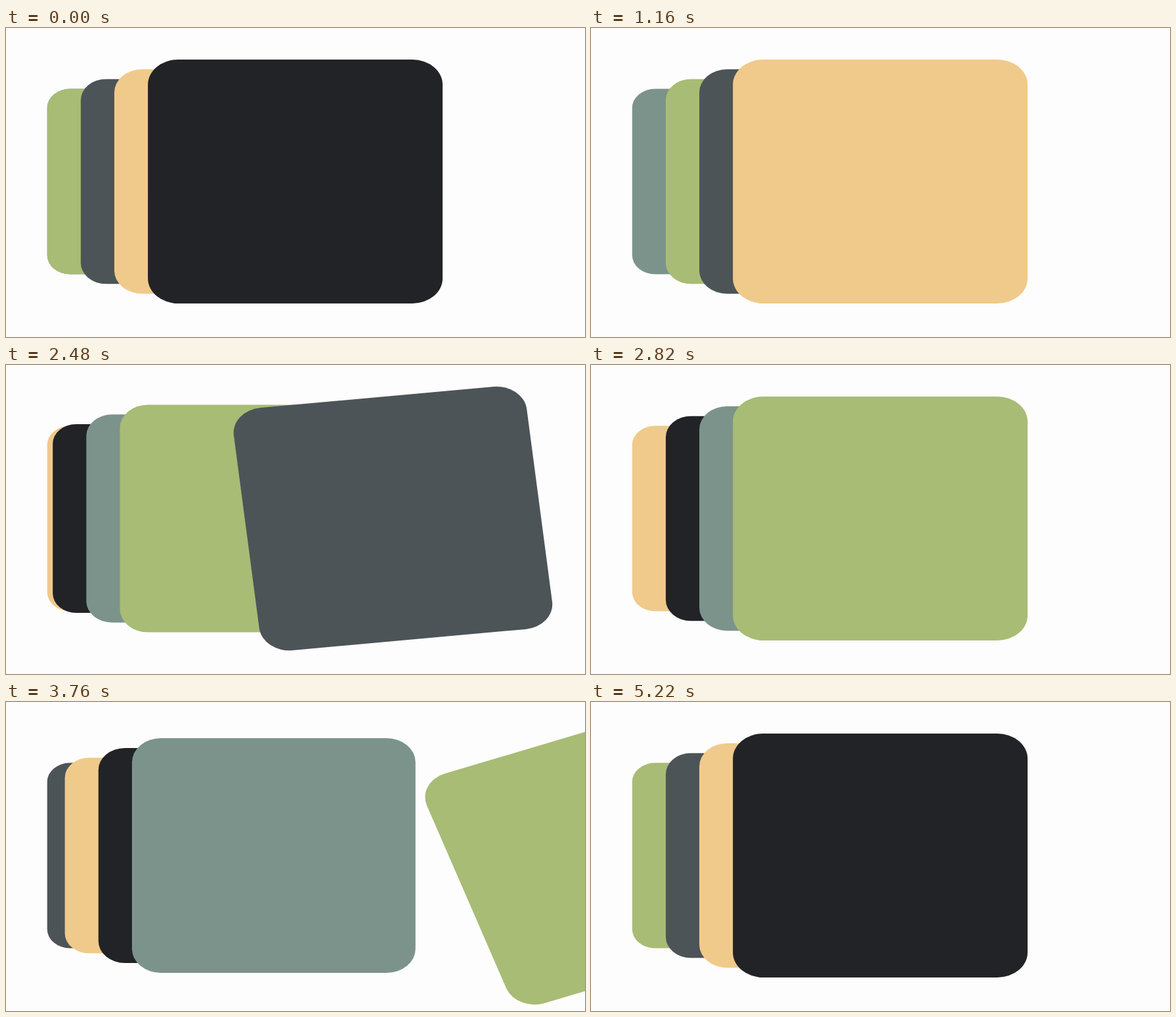
Write an HTML page that moves like this. It is 882 px wide and 470 px high and loops after 5760 ms.

```html
<!DOCTYPE html>
<html lang="en">
<head>
<meta charset="utf-8">
<title>Card stack</title>
<style>
  html, body {
    margin: 0;
    width: 100%;
    height: 100%;
    overflow: hidden;
    background: #fdfdfd;
  }
  .stage {
    position: absolute;
    inset: 0;
    overflow: hidden;
    contain: strict;
  }
  /* The scene is square cards, widened horizontally */
  .stack {
    position: absolute;
    left: 439.5px;
    top: 233.4px;
    transform: scaleX(1.21);
    transform-origin: 0 0;
  }
  .card {
    position: absolute;
    left: -185.5px;
    top: -185.5px;
    width: 371px;
    height: 371px;
    border-radius: 38px;
  }
</style>
</head>
<body>
<div class="stage"><div class="stack"></div></div>
<script>
  const LOOP = 5760;
  const DURATION = 400;
  const STARTS = [0, 1170, 2368, 3555, 4770];
  const COLORS = ['#222326', '#f0ca8b', '#4d5457', '#a8bc75', '#7c938c'];
  const COUNT = COLORS.length;
  const LAST_SLOT = 3;
  const GAP = 57.1;
  const SHRINK = 0.08;
  const EXIT_X = 742;
  const EXIT_TURN = -37.6;

  const stack = document.querySelector('.stack');
  const cards = COLORS.map(color => {
    const card = document.createElement('div');
    card.className = 'card';
    card.style.background = color;
    return stack.appendChild(card);
  });

  // cubic-bezier(.42, 0, .58, 1)
  function easeInOut(x) {
    if (x <= 0) return 0;
    if (x >= 1) return 1;
    let lo = 0, hi = 1, u = 0.5;
    for (let i = 0; i < 24; i++) {
      const v = 1 - u;
      const bx = 1.26 * v * v * u + 1.74 * v * u * u + u * u * u;
      if (bx < x) lo = u; else hi = u;
      u = (lo + hi) / 2;
    }
    return u * u * (3 - 2 * u);
  }

  function pose(depth, p) {
    if (depth === 0) {
      return `translateX(${EXIT_X * p}px) rotate(${EXIT_TURN * p}deg)`;
    }
    const slot = Math.min(LAST_SLOT, depth - p);
    return `translateX(${-GAP * slot}px) scale(${1 - SHRINK * slot})`;
  }

  function draw(time) {
    const t = time % LOOP;
    const step = STARTS.filter(start => start <= t).length - 1;
    const p = easeInOut((t - STARTS[step]) / DURATION);
    cards.forEach((card, i) => {
      const depth = (i - step + COUNT) % COUNT;
      card.style.zIndex = COUNT - depth;
      card.style.transform = pose(depth, p);
    });
  }

  const begin = performance.now();
  function tick() {
    draw(performance.now() - begin);
    requestAnimationFrame(tick);
  }
  tick();
</script>
</body>
</html>
```
